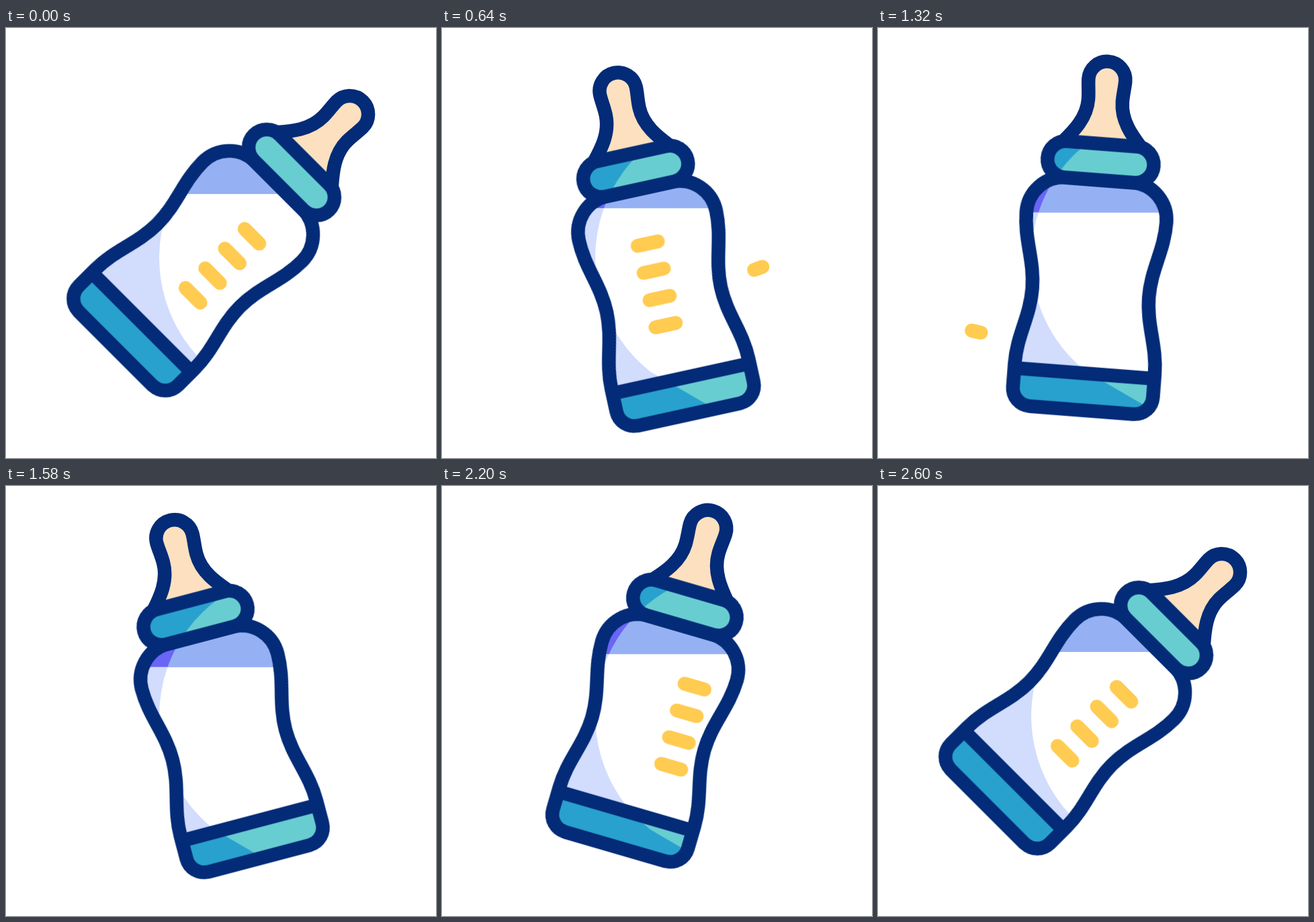
Write an HTML page without scripts that moves like this. It is 640 px wide and 640 px high and loops after 3600 ms.

```html
<!DOCTYPE html>
<html lang="en">
<head>
<meta charset="utf-8">
<title>Baby bottle</title>
<style>
@property --tilt { syntax: "<angle>"; inherits: true; initial-value: 45deg; }
@property --drop { syntax: "<length>"; inherits: true; initial-value: 320px; }
@property --level { syntax: "<length>"; inherits: true; initial-value: 247px; }

html, body { margin: 0; width: 100%; height: 100%; overflow: hidden; background: #fff; }
svg {
  display: block; width: 100vw; height: 100vh;
  animation: tilt 3.6s infinite, drop 3.6s infinite, level 3.6s infinite;
}
/* sine ease wherever a keyframe sets none */
svg, .marks { animation-timing-function: cubic-bezier(.37, 0, .63, 1) !important; }
.bottle { transform: translate(320px, var(--drop)) rotate(var(--tilt)); }
/* undoes the bottle pose, so light and milk stay level */
.still { transform: rotate(calc(-1 * var(--tilt))) translate(-320px, calc(-1 * var(--drop))); }
.air { transform: translateY(var(--level)); }

.line { fill: none; stroke: #032b77; stroke-width: 20.5; }
.mark { fill: none; stroke: #ffcb50; stroke-width: 20.6; stroke-linecap: round; }
.marks { animation: spin 3.6s infinite; }
.trail { opacity: 0; }
.upper { animation: upper 3.6s infinite; }
.lower { animation: lower 3.6s infinite; }

@keyframes tilt {
  0% { --tilt: 45deg; }
  .55% { --tilt: 45deg; animation-timing-function: cubic-bezier(.05, .6, .4, 1); }
  15% { --tilt: -15deg; animation-timing-function: cubic-bezier(.4, 0, .42, 1); }
  30% { --tilt: 15deg; animation-timing-function: cubic-bezier(.55, 0, .5, 1); }
  45% { --tilt: -15deg; animation-timing-function: cubic-bezier(.6, 0, .62, 1); }
  72.22%, 100% { --tilt: 45deg; }
}
@keyframes drop {
  0% { --drop: 320px; }
  16.67% { --drop: 358.5px; }
  72.22%, 100% { --drop: 320px; }
}
@keyframes level {
  0% { --level: 247px; animation-timing-function: cubic-bezier(.35, .58, .65, 1); }
  33.33% { --level: 275px; }
  68.9%, 100% { --level: 247px; }
}
@keyframes spin {
  0% { transform: translateX(0); }
  9.72% { transform: translateX(33px); }
  29.44% { transform: translateX(-145px); animation-timing-function: step-end; }
  36.11% { transform: translateX(150px); animation-timing-function: cubic-bezier(.45, .5, .65, 1); }
  72.22%, 100% { transform: translateX(0); }
}
@keyframes upper {
  0%, 17.2% { opacity: 0; stroke-dasharray: .01 200; stroke-dashoffset: 0; }
  17.21% { opacity: 1; }
  25.56% { stroke-dasharray: 68 200; stroke-dashoffset: -22; animation-timing-function: linear; }
  27.8% { stroke-dasharray: 55 200; stroke-dashoffset: -45; animation-timing-function: ease-out; }
  31.7% { opacity: 1; }
  31.71%, 100% { opacity: 0; stroke-dasharray: .01 200; stroke-dashoffset: -100; }
}
@keyframes lower {
  0%, 20.6% { opacity: 0; stroke-dasharray: .01 200; stroke-dashoffset: 0; }
  20.61% { opacity: 1; }
  25.56% { stroke-dasharray: 15 200; stroke-dashoffset: -39; animation-timing-function: ease-out; }
  36.67% { stroke-dasharray: 4 200; stroke-dashoffset: -91; animation-timing-function: linear; }
  38.9% { opacity: 1; }
  38.91%, 100% { opacity: 0; stroke-dasharray: .01 200; stroke-dashoffset: -100; }
}
</style>
</head>
<body>
<svg viewBox="0 0 640 640">
  <defs>
    <path id="body" d="M-50-121.5C-81-121.5-104.5-96-104.5-66C-104.5-24-87 5-87 47C-87 89-104.5 118-104.5 160V195A27 27 0 0 0-77.5 222H77.5A27 27 0 0 0 104.5 195V160C104.5 118 87 89 87 47C87 5 104.5-24 104.5-66C104.5-96 81-121.5 50-121.5Z"/>
    <rect id="collar" x="-79.3" y="-175.5" width="158.6" height="54" rx="27"/>
    <path id="light" d="M640 127.5H440A212 214.5 0 0 0 310 511.4L480 610H640Z"/>
    <rect id="base" x="-120" y="167" width="240" height="70"/>
    <clipPath id="inBody"><use href="#body"/></clipPath>
    <clipPath id="inCollar"><use href="#collar"/></clipPath>
    <clipPath id="inLight"><use href="#light"/></clipPath>
    <clipPath id="inBase"><use href="#base"/></clipPath>
  </defs>

  <g class="bottle">
    <path class="line" style="fill:#fde0bf" d="M-58-175C-44-191-25.5-212-25.5-240C-25.5-252-27.5-262-27.5-271A27.5 27.5 0 0 1 27.5-271C27.5-262 25.5-252 25.5-240C25.5-212 44-191 58-175"/>

    <g clip-path="url(#inBody)">
      <g class="still">
        <rect width="640" height="640" fill="#d2dcfd"/>
        <use href="#light" fill="#fff"/>
        <rect class="air" y="-640" width="640" height="640" fill="#6b65f6"/>
        <g clip-path="url(#inLight)">
          <rect class="air" y="-640" width="640" height="640" fill="#95b1f3"/>
        </g>
      </g>
      <path class="mark marks" d="M10-39.6h31M10 1.8h31M10 43.2h31M10 84.6h31"/>
      <use href="#base" fill="#28a1ce"/>
      <g clip-path="url(#inBase)">
        <use class="still" href="#light" fill="#68cdd1"/>
      </g>
    </g>
    <use class="line" href="#body"/>
    <path class="line" d="M-104.5 167H104.5"/>

    <use href="#collar" fill="#28a1ce"/>
    <g clip-path="url(#inCollar)">
      <use class="still" href="#light" fill="#68cdd1"/>
    </g>
    <use class="line" href="#collar"/>
  </g>

  <path class="mark trail upper" pathLength="100" d="M481 354Q315.5 416.5 150 351"/>
  <path class="mark trail lower" pathLength="100" d="M478 434Q410 461 313 466T122 446"/>
</svg>
</body>
</html>
```
